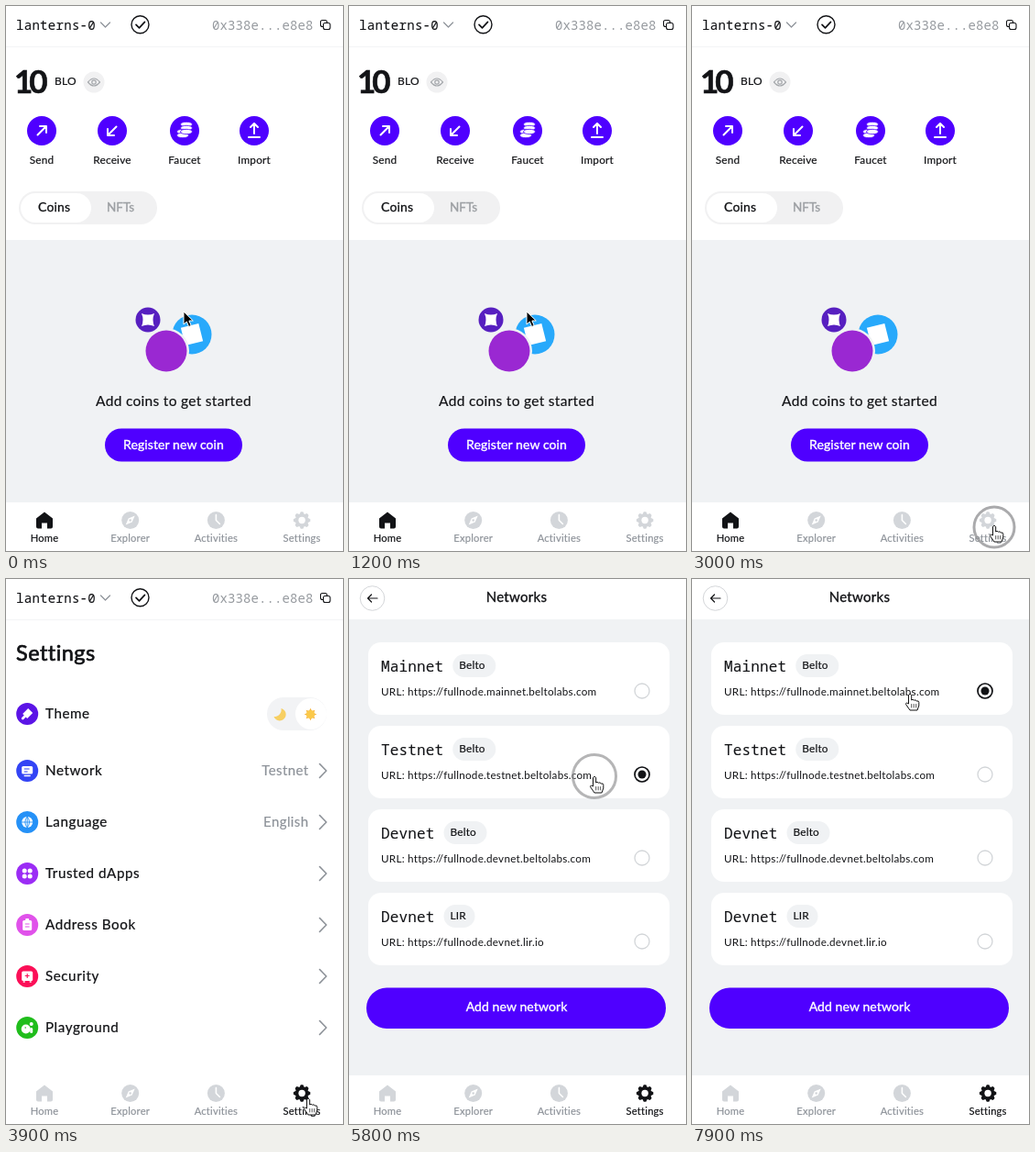
Write an HTML page that moves like this. It is 368 by 594 pixels and loops after 8000 ms.

```html
<!DOCTYPE html>
<html lang="en">
<head>
<meta charset="utf-8">
<title>Wallet settings</title>
<style>
  html, body { margin: 0; width: 100%; height: 100%; overflow: hidden; background: #fff; }
  svg { display: block; width: 368px; height: 594px; }
  text { font-family: Lato, "Open Sans", sans-serif; white-space: pre; }
  .mono { font-family: "Noto Sans Mono", "DejaVu Sans Mono", monospace; }
</style>
</head>
<body>
<svg id="stage" viewBox="0 0 368 594" xmlns="http://www.w3.org/2000/svg"></svg>
<script>
const LOOP = 8000;
const INK = '#121316', MUTED = '#8d9299', PALE = '#d3d6da', WASH = '#f0f2f4', VIOLET = '#4f00ff';

// Drawing helpers
const circle = (x, y, r, fill, extra = '') =>
  `<circle cx="${x}" cy="${y}" r="${r}" fill="${fill}" ${extra}/>`;
const box = (x, y, w, h, fill, rx = 0) =>
  `<rect x="${x}" y="${y}" width="${w}" height="${h}" rx="${rx}" fill="${fill}"/>`;
const shape = (d, fill, extra = '') => `<path d="${d}" fill="${fill}" ${extra}/>`;
const line = (d, color, width = 1.5) =>
  `<path d="${d}" fill="none" stroke="${color}" stroke-width="${width}" stroke-linecap="round" stroke-linejoin="round"/>`;
const at = (x, y, body) => `<g transform="translate(${x} ${y})">${body}</g>`;

function text(x, y, str, size, { fill = INK, weight = 400, anchor = 'start', gap = 0.2, heft = 0.18, cls = '' } = {}) {
  return `<text x="${x}" y="${y}" class="${cls}" font-size="${size}" font-weight="${weight}" fill="${fill}"
    stroke="${fill}" stroke-width="${heft}" text-anchor="${anchor}" letter-spacing="${gap}">${str}</text>`;
}
const mono = (x, y, str, size, gap, fill = INK, heft = 0.1) =>
  text(x, y, str, size, { cls: 'mono', gap, fill, heft });

// Bottom navigation
const navIcons = {
  Home: c => shape('M0 -9 L9 -2 V7 Q9 9 7 9 H3 V3 H-3 V9 H-7 Q-9 9 -9 7 V-2 Z', c),
  Explorer: c => circle(0, 0, 9.5, c) + shape('M5 -5 L2 2 L-5 5 L-2 -2 Z', '#fff') + circle(0, 0, 1.3, c),
  Activities: c => circle(0, 0, 9.5, c) + line('M0 -6 V0 L4 4', '#fff', 1.6),
  Settings: c => Array.from({ length: 8 }, (_, i) =>
    `<path d="M-3.400 -5 L-1.300 -9.200 H1.300 L3.400 -5 Z" fill="${c}" transform="rotate(${i * 45})"/>`).join('') +
    circle(0, 0, 6.3, c) + circle(0, 0, 3.7, '#fff')
};

function nav(active) {
  return box(0, 541, 368, 53, '#fff') + Object.keys(navIcons).map((name, i) => {
    const x = 42 + i * 93.7, on = name === active;
    return at(x, 560.5, navIcons[name](on ? INK : PALE)) +
      text(x, 584, name, 11.2, { anchor: 'middle', fill: on ? INK : MUTED });
  }).join('');
}

const accountBar = () =>
  mono(11, 25.5, 'lanterns-0', 14, 0.3) +
  line('M103.500 18 L108.500 23 L113.500 18', MUTED, 1.2) +
  circle(146.5, 20.3, 9.5, 'none', `stroke="${INK}" stroke-width="1.4"`) +
  line('M142 20.300 L145.500 23.800 L151.500 17.300', INK, 1.7) +
  mono(225, 25.5, '0x338e...e8e8', 14, 0.1, '#969a9f', 0) +
  `<g fill="#fff" stroke="${INK}" stroke-width="1.100"><rect x="343.500" y="15.500" width="7" height="7" rx="2"/>
   <rect x="346.500" y="18.500" width="7.500" height="7" rx="2"/></g>` +
  box(0, 44, 368, 1, '#f3f4f5');

// Home screen
const coinStack = [[2, -7], [2, -3], [-2, 1], [-2, 5], [2, 1]].map(([x, y]) =>
  `<ellipse cx="${x}" cy="${y}" rx="6.500" ry="2.700" fill="#fff" stroke="${VIOLET}" stroke-width=".8"/>`).join('');

const actions = [
  [39, 'Send', line('M-4.500 4.500 L5 -5 M-2 -5 H5 V2', '#fff', 2)],
  [116, 'Receive', line('M4.500 -4.500 L-5 5 M2 5 H-5 V-2', '#fff', 2)],
  [195, 'Faucet', coinStack],
  [271, 'Import', line('M0 3 V-8 M-4 -4 L0 -8 L4 -4 M-6 7 H6', '#fff', 2)]
];

const homeScreen = () => box(0, 0, 368, 594, '#fff') + accountBar() +
  text(9, 95, '10', 35, { weight: 700, gap: -4, heft: 0.6 }) +
  text(53, 86, 'BLO', 12) +
  circle(96, 83, 11.5, '#f1f1f2') +
  line('M89.500 83 Q96 75 102.500 83 Q96 91 89.500 83 Z', '#a4a7ab', 1.2) +
  circle(96, 83, 2.2, 'none', 'stroke="#a4a7ab" stroke-width="1.2"') +
  actions.map(([x, name, icon]) => at(x, 136, circle(0, 0, 16, VIOLET) + icon) +
    text(x, 172, name, 11.8, { anchor: 'middle' })).join('') +
  box(14, 202, 151, 36, '#f1f1f2', 18) + box(16, 204, 77, 32, '#fff', 16) +
  text(35, 224, 'Coins', 14, { heft: 0.3 }) +
  text(110, 224, 'NFTs', 13.5, { fill: '#9c9fa3', gap: 0, heft: 0.4 }) +
  box(0, 255, 368, 286, WASH) +
  circle(155, 342, 13.5, '#571fc0') +
  shape('M148 335 Q155 338 162 335 Q159 342 162 349 Q155 346 148 349 Q151 342 148 335 Z', '#fff') +
  circle(203, 358, 21.5, '#28a9fb') +
  `<rect x="193" y="348" width="20" height="20" fill="#fff" transform="rotate(-14 203 358)"/>` +
  circle(175, 376, 25, WASH) + circle(175, 376, 22.5, '#9a28d2') +
  text(183, 436, 'Add coins to get started', 15.5, { anchor: 'middle', gap: 0.3 }) +
  box(108, 460.5, 150, 36, VIOLET, 18) +
  text(183, 482.5, 'Register new coin', 14, { anchor: 'middle', fill: '#fff', heft: 0.4, gap: 0.1 }) +
  nav('Home');

// Settings screen
const dots = [-3, 3].flatMap(x => [-3, 3].map(y => circle(x, y, 2.5, '#fff'))).join('');
const rows = [
  [147, 'Theme', '#5b14e6', shape('M-5 0 L1 -6 L6 -1 L0 5 Z', '#fff') + line('M-2 2 L-5 5', '#fff', 2.6)],
  [209, 'Network', '#3344f5', box(-6, -5, 12, 8.5, '#fff', 1.5) + line('M-3 -2 H2 M-3 1 H0', '#3344f5', 1) + line('M-3 5.500 H3', '#fff', 1.3), 'Testnet'],
  [265, 'Language', '#2591f7', circle(0, 0, 6, '#fff') + line('M-6 0 H6 M0 -6 V6 M0 -6 Q-5 0 0 6 M0 -6 Q5 0 0 6', '#2591f7', 0.9), 'English'],
  [321, 'Trusted dApps', '#9b2cf5', dots],
  [377, 'Address Book', '#e052ea', box(-5, -5, 10, 11, '#fff', 1.5) + box(-2, -7, 4, 3, '#fff', 1) + line('M-2 -1 H2 M-2 2 H2', '#e052ea', 1)],
  [433, 'Security', '#fb0f57', box(-6, -5.5, 12, 10.5, '#fff', 1.5) + line('M0 -2.500 V1.500 M-2 -.500 H2', '#fb0f57', 1.2) + line('M-4 6 H-3 M3 6 H4', '#fff', 1.3)],
  [489, 'Playground', '#20bd1c', circle(-1.5, 1.5, 5, '#fff') + circle(4.5, -4, 2, '#fff') + circle(-2, 0, 0.8, '#20bd1c') + box(3, 0, 3, 6, '#fff', 1.5)]
];

const rays = Array.from({ length: 8 }, (_, i) =>
  `<path d="M-1.600 -3.500 L0 -6.800 L1.600 -3.500 Z" fill="#f6b43c" transform="rotate(${i * 45})"/>`).join('');

const settingsScreen = () => box(0, 0, 368, 594, '#fff') + accountBar() +
  text(11, 89, 'Settings', 23.5, { heft: 0.7, gap: 0.45 }) +
  rows.map(([y, name, color, icon, value]) =>
    at(23.2, y, circle(0, 0, 12, color) + icon) +
    text(43, y + 4.5, name, 15.2, { gap: 0.55, heft: 0.22 }) +
    (value ? text(330.5, y + 4.5, value, 15, { anchor: 'end', fill: MUTED, gap: 0.4 }) : '') +
    (name === 'Theme' ? '' : line(`M342.500 ${y - 7.5} L349.800 ${y} L342.500 ${y + 7.5}`, '#8b9097', 1.6))).join('') +
  box(285, 129, 65, 36, '#f2f3f5', 18) + circle(333, 147, 17, '#fff') +
  shape('M300.500 141 A6.800 6.800 0 1 1 292.500 150 A7.500 7.500 0 0 0 300.500 141 Z', '#f7cf62') +
  at(332.5, 147.5, rays + circle(0, 0, 4.5, '#fbc94a')) +
  nav('Settings');

// Networks screen
const networks = [
  ['Mainnet', 'Belto', 'mainnet.beltolabs.com'],
  ['Testnet', 'Belto', 'testnet.beltolabs.com'],
  ['Devnet', 'Belto', 'devnet.beltolabs.com'],
  ['Devnet', 'LIR', 'devnet.lir.io']
];

const networksScreen = () => box(0, 0, 368, 594, '#fff') +
  circle(25.5, 21, 13.3, '#fff', 'stroke="#d4d6d9"') +
  line('M31 21 H20.500 M24.500 17 L20.500 21 L24.500 25', INK, 1.2) +
  text(183, 24.5, 'Networks', 15, { anchor: 'middle', heft: 0.35, gap: 0.3 }) +
  box(0, 44, 368, 497, WASH) +
  networks.map(([name, chain, host], i) => {
    const y = 69 + i * 91, tag = 45 + name.length * 9.75;
    return box(21, y, 329, 79, '#fff', 14) +
      mono(35, y + 31.5, name, 16, 0.15) +
      box(tag, y + 13, chain.length > 3 ? 47 : 34, 25, WASH, 12.5) +
      text(tag + 7, y + 29, chain, 11.8) +
      text(35, y + 58, 'URL: https://fullnode.' + host, 11.7, { heft: 0, gap: 0.24 }) +
      circle(320, y + 53, 8, '#fff', 'stroke="#d2d5d8" stroke-width="1.3"');
  }).join('') +
  `<g id="radio">${circle(320, 122, 8, '#fff', `stroke="${INK}" stroke-width="1.7"`)}${circle(320, 122, 4.5, INK)}</g>` +
  box(19, 445.5, 327, 44.5, VIOLET, 22) +
  text(183, 470.5, 'Add new network', 14, { anchor: 'middle', fill: '#fff', heft: 0.4, gap: 0.1 }) +
  nav('Settings');

// Pointers, drawn from their hot spots
const arrow = shape('M0 0 V14 L3.300 11 L5.600 16.500 L8.200 15.400 L5.900 10 H10.300 Z', '#000',
  'stroke="#fff" stroke-width="1"');
const hand = shape('M-1.500 1.500 Q0 -1 1.700 1.500 V7 Q3 5.500 4.500 7.200 Q6 6 7.300 8 Q9.500 7.200 9.800 9.500 V13 L8 18 H0 L-4.500 11.500 Q-4.500 9 -1.500 11 Z',
  '#fff', 'stroke="#111" stroke-width="1" stroke-linejoin="round"') +
  line('M1.700 11.500 V15 M4.200 11.500 V15 M6.700 11.500 V15', '#111', 0.7);

const stage = document.getElementById('stage');
const group = (id, body) => `<g id="${id}">${body}</g>`;
stage.innerHTML = group('home', homeScreen()) + group('settings', settingsScreen()) +
  group('networks', networksScreen()) +
  `<circle id="ring" fill="none" stroke="#8e8e90"/>` +
  group('pointer', group('arrow', arrow) + group('hand', hand));
const el = id => document.getElementById(id);
const show = (id, on) => el(id).setAttribute('display', on ? 'inline' : 'none');

// Motion: time, x, y
const path = [
  [0, 194, 333], [1900, 194, 333], [2200, 310, 450], [2700, 330, 566], [4200, 330, 566],
  [5100, 268, 218], [5300, 268, 218], [5500, 268, 215], [6400, 268, 215], [7000, 238, 125], [LOOP, 238, 125]
];

// A press shows a still ring; the release acts, and the ring grows and fades
const HOLD = 150, FADE = 400;
const presses = [[2900, 330, 568], [5600, 268, 215], [7150, 238, 122]];
const [openSettings, openNetworks, pickMainnet] = presses.map(p => p[0] + HOLD);
const ease = u => u * u * (3 - 2 * u);

function position(t) {
  const i = path.findIndex(p => p[0] > t);
  const [t0, x0, y0] = path[i - 1], [t1, x1, y1] = path[i];
  const u = ease((t - t0) / (t1 - t0));
  return [x0 + (x1 - x0) * u, y0 + (y1 - y0) * u];
}

function drawRing(t) {
  const press = presses.find(([t0]) => t >= t0 && t < t0 + HOLD + FADE);
  show('ring', press);
  if (!press) return;
  const [t0, cx, cy] = press;
  const u = Math.max(0, (t - t0 - HOLD) / FADE);
  const attrs = { cx, cy, r: 22 + 12 * u, 'stroke-width': 3, opacity: 0.75 * (1 - u) };
  for (const key in attrs) el('ring').setAttribute(key, attrs[key]);
}

function draw(t) {
  show('home', t < openSettings);
  show('settings', t >= openSettings && t < openNetworks);
  show('networks', t >= openNetworks);
  el('radio').setAttribute('transform', `translate(0 ${t < pickMainnet ? 91 : 0})`);

  const [x, y] = position(t);
  el('pointer').setAttribute('transform', `translate(${x} ${y})`);
  show('arrow', t < 2600);
  show('hand', t >= 2600);
  drawRing(t);
}

const start = performance.now();
function tick() {
  draw((performance.now() - start) % LOOP);
  requestAnimationFrame(tick);
}
tick();
</script>
</body>
</html>
```
